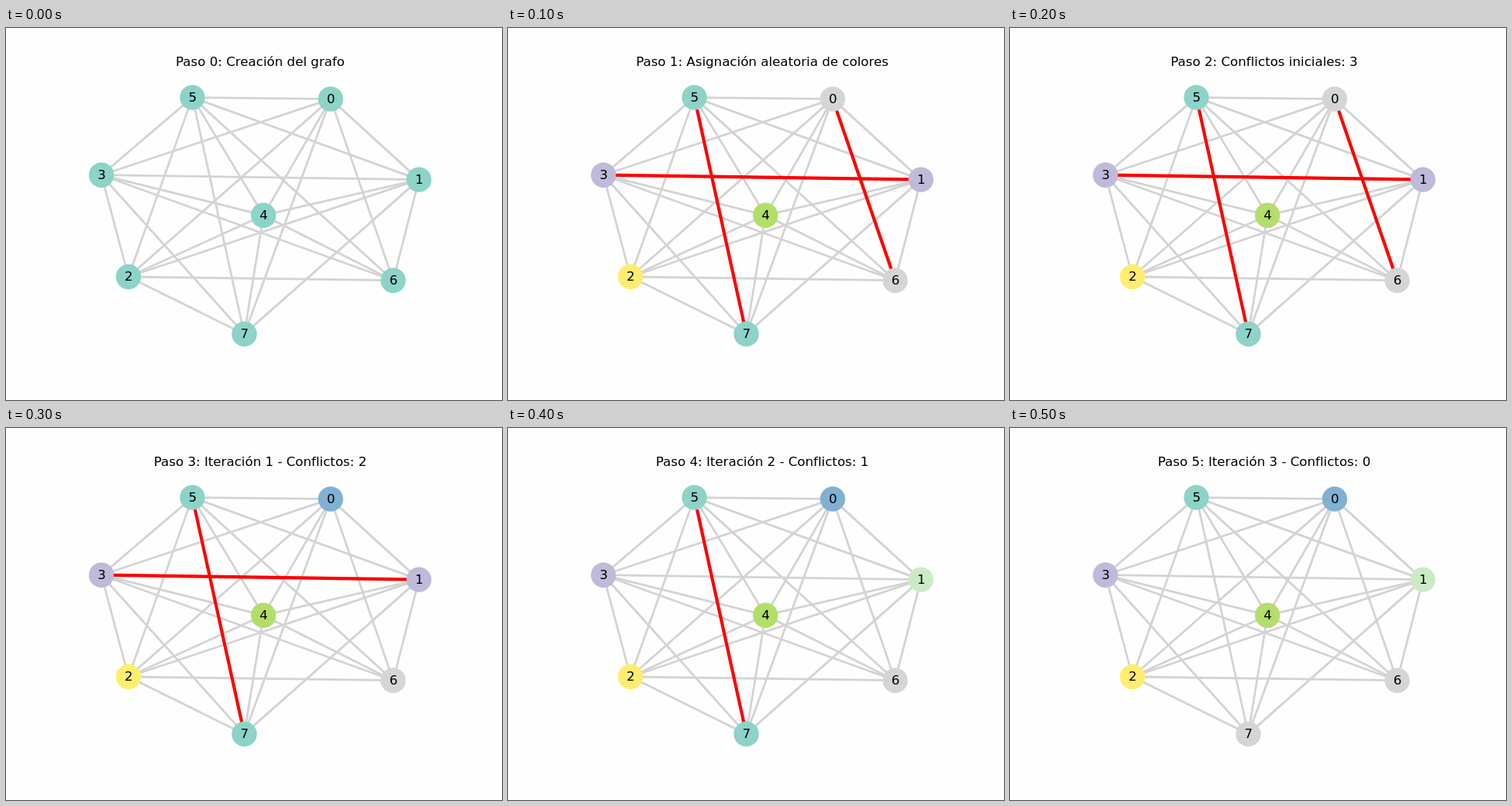
An HTML page with a canvas that plays this animation: 640 px wide and 480 px high, repeating every 0.6 s.

```html
<!DOCTYPE html>
<html lang="es">
<head>
<meta charset="utf-8">
<title>Coloreado de grafo</title>
<style>
html, body { margin: 0; height: 100%; overflow: hidden; background: #fefefe; }
canvas { display: block; }
</style>
</head>
<body>
<canvas id="stage" width="640" height="480"></canvas>
<script>
const ctx = document.getElementById('stage').getContext('2d');
const STEP_MS = 100;

const nodes = [
  [418.9, 91.6], [532.8, 195.6], [158, 321], [123.1, 189.7],
  [332.2, 241.7], [240.5, 89.6], [499.6, 325.7], [307.5, 394.9]
];

const palette = {
  t: '#8dd3c7', p: '#bebada', b: '#80b1d3', g: '#b3de69',
  x: '#d5d5d5', m: '#ccebc5', y: '#ffed6f'
};

// One colour letter per node, in node order
const steps = [
  ['Creación del grafo', 'tttttttt'],
  ['Asignación aleatoria de colores', 'xpypgtxt'],
  ['Conflictos iniciales: 3', 'xpypgtxt'],
  ['Iteración 1 - Conflictos: 2', 'bpypgtxt'],
  ['Iteración 2 - Conflictos: 1', 'bmypgtxt'],
  ['Iteración 3 - Conflictos: 0', 'bmypgtxx']
];

// Every pair is joined except 6 and 7
const edges = [];
for (let a = 0; a < 8; a++)
  for (let b = a + 1; b < 8; b++)
    if (a !== 6) edges.push([a, b]);

function drawEdge([a, b], color, width) {
  ctx.strokeStyle = color;
  ctx.lineWidth = width;
  ctx.beginPath();
  ctx.moveTo(...nodes[a]);
  ctx.lineTo(...nodes[b]);
  ctx.stroke();
}

function draw(index) {
  const [title, colors] = steps[index];
  ctx.fillStyle = '#fefefe';
  ctx.fillRect(0, 0, 640, 480);

  edges.forEach(e => drawEdge(e, '#d3d3d3', 2.78));
  if (index > 0)
    edges.filter(([a, b]) => colors[a] === colors[b])
      .forEach(e => drawEdge(e, '#ff0000', 4.17));

  nodes.forEach(([x, y], i) => {
    ctx.fillStyle = palette[colors[i]];
    ctx.beginPath();
    ctx.arc(x, y, 16.2, 0, 2 * Math.PI);
    ctx.fill();
  });

  ctx.fillStyle = '#000';
  ctx.font = '16.667px "DejaVu Sans", sans-serif';
  ctx.textAlign = 'center';
  ctx.fillText(`Paso ${index}: ${title}`, 328, 49);
  nodes.forEach(([x, y], i) => ctx.fillText(i, x + 0.4, Math.round(y + 5)));
}

function tick() {
  draw(Math.floor(performance.now() / STEP_MS) % steps.length);
  requestAnimationFrame(tick);
}
tick();
</script>
</body>
</html>
```
